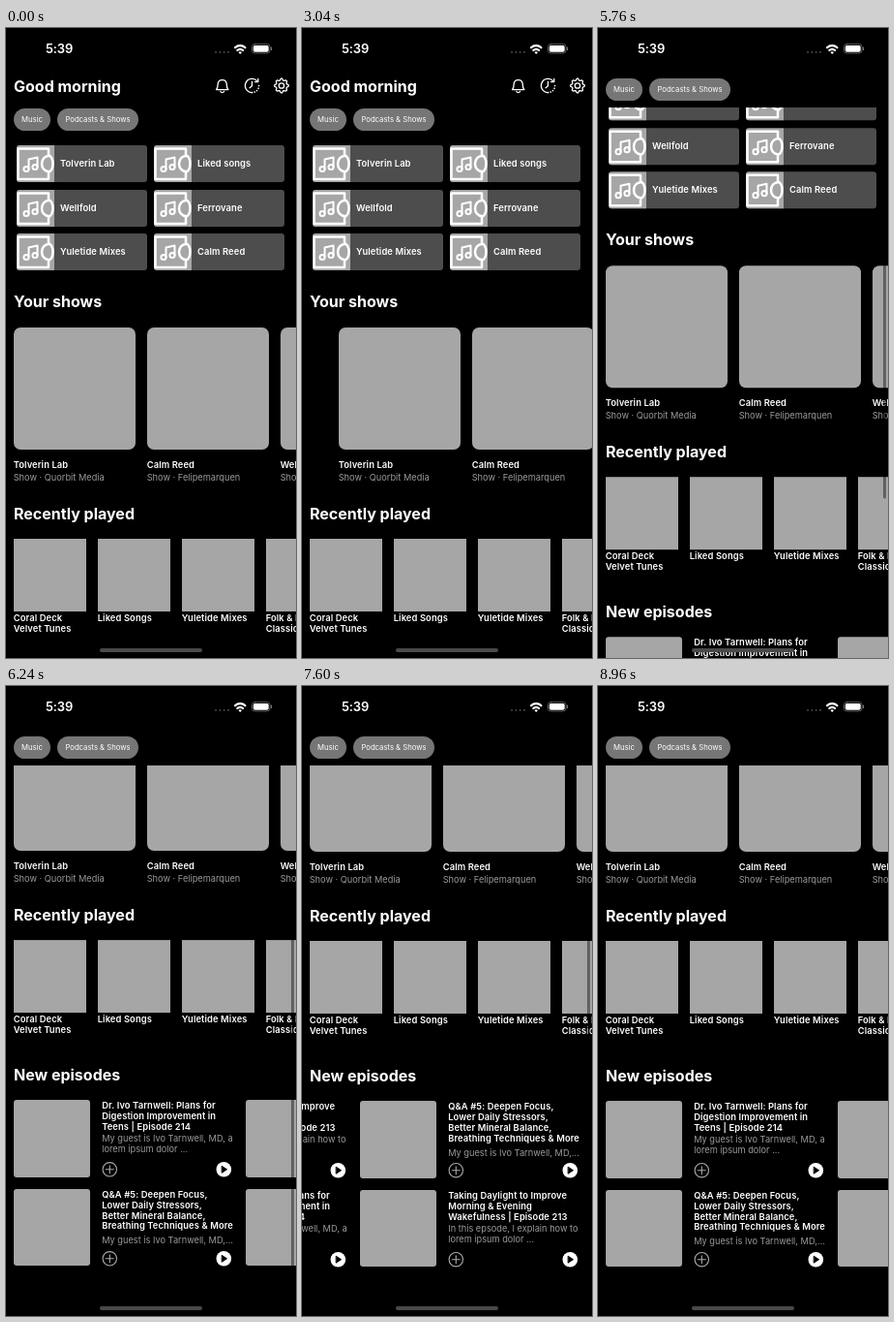
Recreate the animation shown at these times as an HTML page. Size 300 by 650 pixels, loop 9040 ms.

```html
<!DOCTYPE html>
<html lang="en">
<head>
<meta charset="utf-8">
<style>
html, body { margin: 0; width: 100%; height: 100%; overflow: hidden; background: #000; }
body { position: relative; color: #fff; font: 600 9.4px/10.9px Inter, Arial, sans-serif; letter-spacing: .01em; }
div, svg { position: absolute; }
svg { left: 0; top: 0; overflow: visible; fill: none; stroke: #fff; stroke-linecap: round; stroke-linejoin: round; }
.t { white-space: pre; }
.head { font-size: 16px; font-weight: 700; letter-spacing: 0; }
.sub { font-size: 9.23px; font-weight: 400; letter-spacing: 0; color: #999; }
.chip { top: 7.5px; height: 23px; border-radius: 12px; background: #767676; font: 400 7.7px/23px Inter, Arial, sans-serif; letter-spacing: 0; text-align: center; }
.art { background: #a6a6a6; }
.tile { width: 135px; height: 38px; border-radius: 3px; background: #4d4d4d; overflow: hidden; }
#view { left: 0; top: 44px; width: 300px; height: 606px; overflow: hidden; }
#page { left: 0; top: -44px; width: 300px; height: 950px; }
#bar { left: 0; top: 31px; width: 300px; height: 38px; background: #000; }
#thumb { left: 295px; top: 54px; width: 2.5px; height: 388px; border-radius: 2px; background: rgba(0,0,0,.42); }
#home { left: 97px; top: 640px; width: 106px; height: 4px; border-radius: 2px; background: #4a4a4a; }
.row { left: 0; top: 0; }
</style>
</head>
<body>
<div id="view">
  <div id="page"></div>
  <div id="bar">
    <div class="chip" style="left:8px;width:38px">Music</div>
    <div class="chip" style="left:53px;width:84px">Podcasts &amp; Shows</div>
  </div>
</div>
<div id="thumb"></div>
<div id="home"></div>
<div class="t" style="left:41px;top:16px;font-size:13px;letter-spacing:-.01em">5:39</div>
<svg width="300" height="44">
  <path d="M217 25h13.5" stroke="#444" stroke-width="2" stroke-dasharray=".1 4.2"/>
  <path d="M237 20.3a7.4 7.4 0 0 1 10.4 0M239.3 23a4.1 4.1 0 0 1 5.8 0" stroke-width="2.2"/>
  <path d="M242.2 27l-1.7-1.8a2.4 2.4 0 0 1 3.4 0z" fill="#fff" stroke="none"/>
  <rect x="254.5" y="16.7" width="18.5" height="9.3" rx="2.8" stroke="#777" stroke-width=".8"/>
  <rect x="255.8" y="18" width="15.9" height="6.7" rx="1.7" fill="#fff" stroke="none"/>
  <path d="M274.4 20v2.7" stroke="#888"/>
</svg>

<script>
const LOOP = 9040, STEP = 80, WIDTH = 300, LEFT = 7.7;
const [page, bar, thumb] = ['page', 'bar', 'thumb'].map(id => document.getElementById(id));

// Text is placed by the middle of its first line.
const text = (x, y, s, cls = '') =>
  `<div class="t ${cls}" style="left:${x}px;top:${y - 5}px">${s.replace(/&/g, '&amp;')}</div>`;
const art = (x, y, size, radius) =>
  `<div class="art" style="left:${x}px;top:${y}px;width:${size}px;height:${size}px;border-radius:${radius}px"></div>`;

const album = `<svg width="39" height="38" stroke-width="2.5">
  <path d="M1.5 3.5H33V11a7 8 0 0 0 0 16v8H1.5z"/>
  <path d="M33 10.5a4.5 8.5 0 0 1 0 17"/>
  <path d="M12.5 24.5V14.5l9-2v10" stroke-width="2"/>
  <circle cx="10" cy="24.5" r="2.6" stroke-width="2"/>
  <circle cx="19" cy="22.5" r="2.6" stroke-width="2"/></svg>`;

function gear(cx, cy) {
  let points = '';
  for (let i = 0; i < 32; i++) {
    const r = i % 4 < 2 ? 7.3 : 5.7, a = (i - .5) * Math.PI / 16;
    points += `${cx + r * Math.cos(a)},${cy + r * Math.sin(a)} `;
  }
  return `<polygon points="${points}"/><circle cx="${cx}" cy="${cy}" r="2.7"/>`;
}

const icons = `<svg width="300" height="120" stroke-width="1.3">
  <path d="M217.5 63.6c1.6-1.5 1.6-3 1.6-5 0-3 1.8-5 4.6-5s4.6 2 4.6 5c0 2 0 3.5 1.6 5z"/>
  <path d="M221.9 65.4a1.9 1.9 0 0 0 3.6 0"/>
  <path d="M254.5 66.6a7.1 7.1 0 1 1 5.6-11.5M260.8 52.4v3.2h-3.3M254.5 55.5v4.2l-2.4 2"/>
  <path d="M261.6 59.6a7.1 7.1 0 0 1-7.1 7" stroke-dasharray=".1 2.6" stroke-width="1.6"/>
  ${gear(285, 59.5)}</svg>`;

const LAB = 'Tolverin Lab', WELL = 'Wellfold', METAL = 'Ferrovane', XMAS = 'Yuletide Mixes', TONE = 'Calm Reed';

const tile = (name, i) => {
  const x = 11 + i % 2 * 142, y = 121 + (i >> 1) * 45.6;
  return `<div class="tile" style="left:${x}px;top:${y}px">${art(0, 0, 39, 0)}${album}</div>` +
    text(x + 45, y + 19, name);
};
const show = ([name, by], x) =>
  art(x, 308.5, 126, 7) + text(x, 451, name) + text(x, 463.5, 'Show · ' + by, 'sub');
const played = (name, x) => art(x, 527, 75, 0) + text(x, 609, name);

const button = (x, y) => `<svg style="left:${x}px;top:${y}px" width="240" height="80">
  <g stroke="#aaa" stroke-width="1.1"><circle cx="99.3" cy="71.7" r="7.2"/><path d="M95.3 71.7h8m-4-4v8"/></g>
  <circle cx="217.3" cy="71.7" r="7.8" fill="#fff" stroke="none"/>
  <path d="M215.5 68.4l5 3.3-5 3.3z" fill="#000" stroke="#000"/></svg>`;
function episode([title, about], x, y) {
  const lines = title.split('\n').length;
  return art(x, y, 79.5, 3) + text(x + 91.5, y + 6, title) +
    text(x + 91.5, y + lines * 13.4, about, 'sub') + button(x, y);
}

const talks = [
  ['Dr. Ivo Tarnwell: Plans for\nDigestion Improvement in\nTeens | Episode 214',
    'My guest is Ivo Tarnwell, MD, a\nlorem ipsum dolor ...'],
  ['Q&A #5: Deepen Focus,\nLower Daily Stressors,\nBetter Mineral Balance,\nBreathing Techniques & More',
    'My guest is Ivo Tarnwell, MD,...'],
  ['Taking Daylight to Improve\nMorning & Evening\nWakefulness | Episode 213',
    'In this epsode, I explain how to\nlorem ipsum dolor ...']
];
const pair = (i, x) => [0, 1].map(k => episode(talks[(2 * i + k) % 3], x, 692 + k * 91.7)).join('');

// Each row is swiped to its end at `out` and flung home at `back`.
const rows = [
  { title: 'Your shows', y: 282, pitch: 138, pad: 14, out: 1640, back: 2600, make: show, items: [
    [LAB, 'Quorbit Media'], [TONE, 'Felipemarquen'], [WELL, 'Dr. Orlen Vask'],
    [METAL, 'Quorbit Media'], ['Slow Harbor', 'Felipemarquen']] },
  { title: 'Recently played', y: 500.5, pitch: 87, pad: 14, out: 3560, back: 4520, make: played, items: [
    'Coral Deck\nVelvet Tunes', 'Liked Songs', XMAS, 'Folk & Rust\nClassic Reels',
    LAB, 'Coppery\nStatic Static', 'Pop Rush 80s', TONE] },
  { title: 'New episodes', y: 666, pitch: 240, pad: 8, out: 6880, back: 7920, make: pair, items: [0, 1, 2] }
];

page.innerHTML = text(8, 59.5, 'Good morning', 'head') + icons +
  [LAB, 'Liked songs', WELL, METAL, XMAS, TONE].map(tile).join('') +
  rows.map(r => text(8, r.y, r.title, 'head') +
    `<div class="row">${r.items.map((item, i) => r.make(item, LEFT + i * r.pitch)).join('')}</div>`).join('');
document.querySelectorAll('.row').forEach((el, i) => {
  const r = rows[i];
  r.el = el;
  r.end = r.items.length * r.pitch + r.pad - WIDTH;
});

const smooth = u => { u = Math.min(1, Math.max(0, u)); return u * u * (3 - 2 * u); };

// Travels `dist` plus an overshoot in `time` ms, then settles back.
function swipe(t, time, dist, over = 0) {
  return (dist + over) * smooth(t / time) - over * smooth((t - time) / 400);
}

function draw() {
  const t = Math.floor(performance.now() % LOOP / STEP) * STEP;
  const y = swipe(t - 5480, 920, 264, 24);
  page.style.transform = `translateY(${-y}px)`;
  bar.style.transform = `translateY(${-Math.min(y, 31)}px)`;
  thumb.style.transform = `translateY(${Math.min(y, 264) * .683}px)`;
  thumb.style.opacity = y > 0 ? 1 - smooth((t - 8320) / 320) : 0;
  for (const r of rows) {
    const x = swipe(t - r.out, 680, r.end) - swipe(t - r.back, 440, r.end, 30);
    r.el.style.transform = `translateX(${-x}px)`;
  }
  requestAnimationFrame(draw);
}
draw();
</script>
</body>
</html>
```
